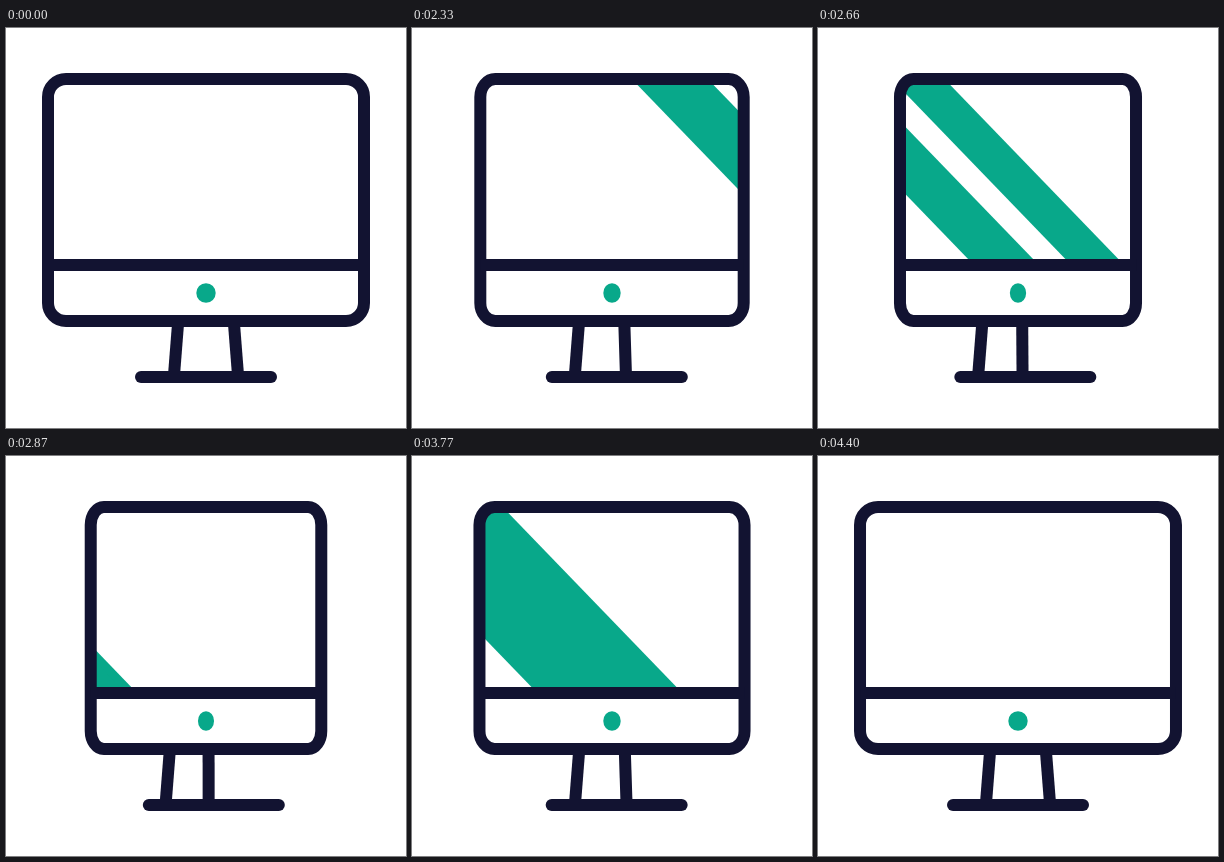
These frames come from a looping animation (400x400 px, 4430 ms). An HTML page with a canvas:

```html
<!DOCTYPE html>
<html lang="en">
<head>
<meta charset="utf-8">
<title>Turning monitor</title>
<style>
  html, body { margin: 0; width: 100%; height: 100%; overflow: hidden; background: #fff; }
  canvas { display: block; width: 400px; height: 400px; }
</style>
</head>
<body>
<canvas id="stage" width="400" height="400"></canvas>
<script>
const ctx = document.getElementById('stage').getContext('2d');
const NAVY = '#121331', GREEN = '#08a88a';
const LOOP = 4430, HOLD = 2000, STEP = 30;
const SCREEN_TOP = 51, SCREEN_BOTTOM = 237, SLOPE = 0.966;

const lerp = (a, b, k) => a + (b - a) * k;
const progress = (t, start, end) => Math.min(1, Math.max(0, (t - start) / (end - start)));
const smooth = u => u * u * (3 - 2 * u);

// Cubic ease whose handles lie flat at both ends.
function ease(x, x1, x2) {
  let lo = 0, hi = 1;
  for (let i = 0; i < 24; i++) {
    const u = (lo + hi) / 2, v = 1 - u;
    if (3 * v * v * u * x1 + 3 * v * u * u * x2 + u * u * u < x) lo = u;
    else hi = u;
  }
  return smooth((lo + hi) / 2);
}

function turnAt(t) {
  return t < 3180
    ? ease(progress(t, HOLD, 3140), 0.333, 0)
    : 1 - ease(progress(t, 3180, LOOP), 0.667, 0.333);
}

function line(x1, y1, x2, y2, cap = 'butt') {
  ctx.lineCap = cap;
  ctx.beginPath();
  ctx.moveTo(x1, y1);
  ctx.lineTo(x2, y2);
  ctx.stroke();
}

// Slanted band; center is measured along the top inner edge of the screen.
function stripe(center, width) {
  const edge = y => center + (y - 57) * SLOPE;
  const top = edge(SCREEN_TOP), bottom = edge(SCREEN_BOTTOM), half = width / 2;
  ctx.beginPath();
  ctx.moveTo(top - half, SCREEN_TOP);
  ctx.lineTo(top + half, SCREEN_TOP);
  ctx.lineTo(bottom + half, SCREEN_BOTTOM);
  ctx.lineTo(bottom - half, SCREEN_BOTTOM);
  ctx.fill();
}

function reflections(t) {
  if (t < 3300) {
    const drift = (t - 2510) / 30;
    stripe(lerp(395, -125, ease(progress(t, HOLD, 3290), 0.333, 0.333)), 70 - drift);
    stripe(lerp(400, -125, smooth(progress(t, 2265, 2996))), 48 + drift);
  } else {
    stripe(lerp(-185, 460, smooth(progress(t, 3365, LOOP))), 145);
  }
}

function framePath(half, rx) {
  const cx = 200, l = cx - half, r = cx + half, top = 51, bottom = 293, ry = 18;
  const q = Math.PI / 2;
  ctx.beginPath();
  ctx.ellipse(l + rx, top + ry, rx, ry, 0, 2 * q, 3 * q);
  ctx.ellipse(r - rx, top + ry, rx, ry, 0, 3 * q, 4 * q);
  ctx.ellipse(r - rx, bottom - ry, rx, ry, 0, 0, q);
  ctx.ellipse(l + rx, bottom - ry, rx, ry, 0, q, 2 * q);
  ctx.closePath();
}

function draw(t) {
  const p = turnAt(t), half = 158 - 43.7 * p;

  ctx.fillStyle = '#fff';
  ctx.fillRect(0, 0, 400, 400);
  ctx.strokeStyle = NAVY;
  ctx.fillStyle = GREEN;
  ctx.lineWidth = 12;

  line(172 - 8.5 * p, 296, 168 - 8.5 * p, 347);
  line(228 - 26 * p, 296, 232 - 30 * p, 347);
  line(135 + 8 * p, 349, 265 + 8 * p, 349, 'round');

  framePath(half, 18 * half / 158);
  if (t > HOLD) {
    ctx.save();
    ctx.clip();
    reflections(t);
    ctx.restore();
    framePath(half, 18 * half / 158);
  }
  ctx.stroke();
  line(200 - half, 237, 200 + half, 237);

  ctx.beginPath();
  ctx.ellipse(200, 265, 9.7 - 1.7 * p, 9.8, 0, 0, Math.PI * 2);
  ctx.fill();
}

const origin = performance.now();
function tick() {
  const t = (performance.now() - origin) % LOOP;
  draw(t < HOLD ? HOLD : HOLD + Math.floor((t - HOLD) / STEP) * STEP);
  requestAnimationFrame(tick);
}
tick();
</script>
</body>
</html>
```
